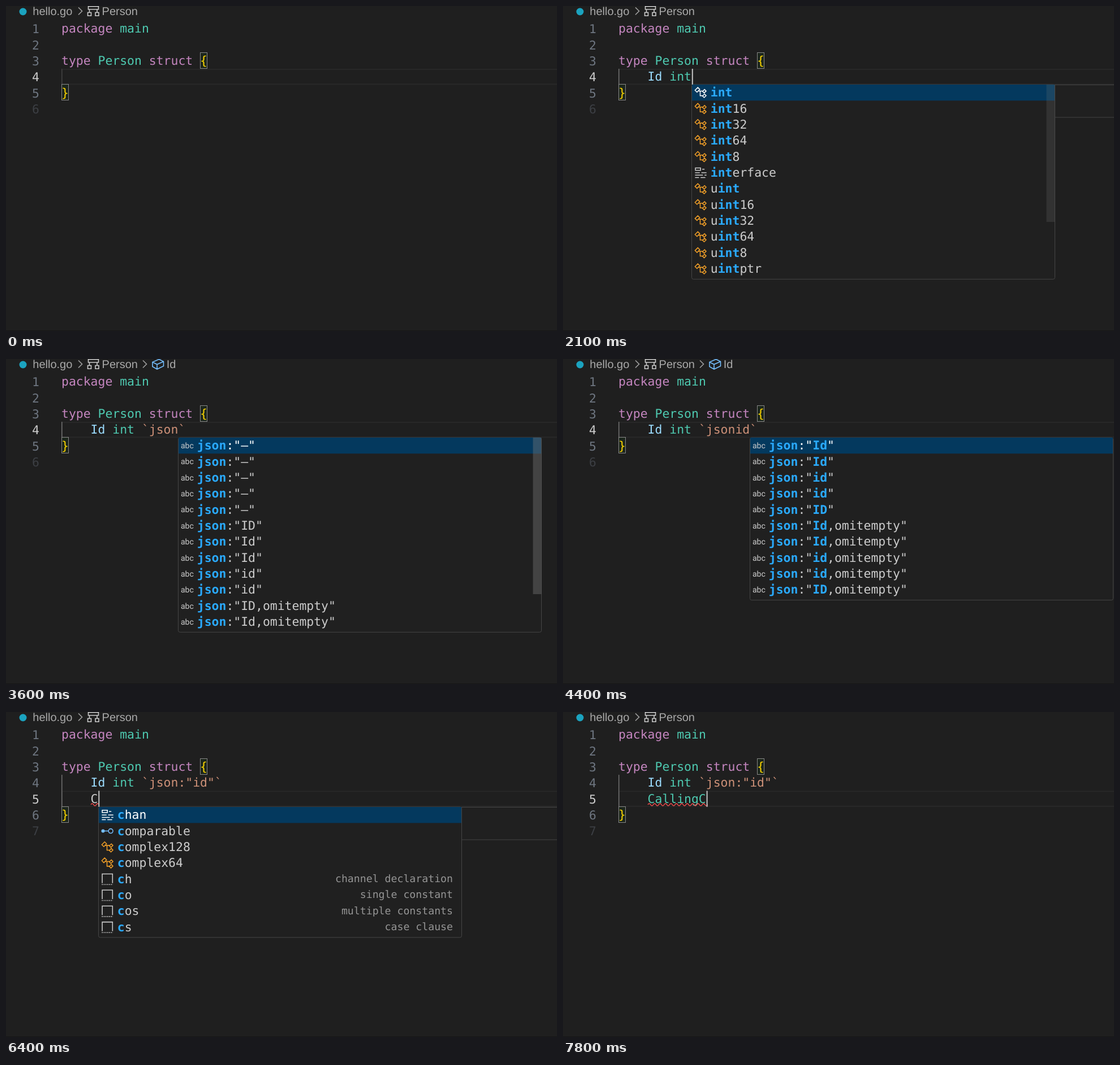
These frames come from a looping animation (974 px wide and 575 px high, 8000 ms). An HTML page:

```html
<!DOCTYPE html>
<html lang="en">
<head>
<meta charset="utf-8">
<title>Typing a struct</title>
<style>
  html, body { margin: 0; width: 100%; height: 100%; overflow: hidden; background: #1f1f1f; }
  svg { display: block; width: 974px; height: 575px; }
  text { font: 21.43px "DejaVu Sans Mono", monospace; white-space: pre; text-rendering: geometricPrecision; }
  .ui { font: 20px "Liberation Sans", Arial, sans-serif; }
  .abc { font: 14px Roboto, sans-serif; }
  .note { font-size: 18.2px; text-anchor: end; }
  .hit { font-weight: bold; fill: #2aaaff; }
</style>
</head>
<body>
<svg id="stage" viewBox="0 0 974 575"></svg>
<script>
const LOOP = 8000, CW = 12.9, LH = 28.36, LEFT = 98, POP_W = 642;
const PINK = '#c586c0', TEAL = '#4ec9b0', GREY = '#cccccc', BLUE = '#9cdcfe',
      STR = '#ce9178', GOLD = '#ffd700', ORANGE = '#ee9d28', SKY = '#75beff', EDGE = '#454545';

// Suggestions: icon letter, label, optional note
const sizes = ['', '16', '32', '64', '8'];
const INTS = [...sizes.map(s => ['t', 'int' + s]), ['k', 'interface'],
              ...sizes.map(s => ['t', 'uint' + s]), ['t', 'uintptr']];
const tags = names => names.map(n => ['a', `json:"${n}"`]);
const KEYS = ['Id', 'Id', 'id', 'id', 'ID'];
const TAGS = tags(['–', '–', '–', '–', '–', 'ID', 'Id', 'Id', 'id', 'id', 'ID,omitempty', 'Id,omitempty']);
const ID_TAGS = tags([...KEYS, ...KEYS.map(k => k + ',omitempty')]);
const CS = [['k', 'chan'], ['i', 'comparable'], ['t', 'complex128'], ['t', 'complex64'],
            ['s', 'ch', 'channel declaration'], ['s', 'co', 'single constant'],
            ['s', 'cos', 'multiple constants'], ['s', 'cs', 'case clause']];

const pop = (list, word, more = {}) => ({ list, word, sel: 0, ...more });
const ints = word => pop(INTS, word, { docs: 1, bar: 243, fade: .2 });
const json = word => pop(TAGS, word, { bar: 277, fade: .4 });
const picked = sel => pop(ID_TAGS, 'jsonid', { sel });

// Each step changes only the listed parts of the state
const STEPS = [
  [0, { rows: [''], tint: GREY, wave: 0, caret: 0, shut: 0, crumb: 0, pop: null, guide: '#404040' }],
  [300, { caret: 1 }],
  [800, { type: 'I', guide: '#707070' }],
  [900, { wave: 1, pop: ints('i') }],
  [1000, { type: 'Id', pop: null }],
  [1100, { wave: 2 }],
  [1300, { type: 'Id ' }],
  [1400, { tint: TEAL }],
  [1800, { type: 'Id i' }],
  [1900, { tint: BLUE, wave: 0, pop: ints('i') }],
  [2000, { type: 'Id in', pop: ints('in') }],
  [2100, { type: 'Id int', pop: ints('int') }],
  [2200, { type: 'Id int ', pop: null }],
  [2400, { type: 'Id int ``', shut: 1 }],
  [2800, { type: 'Id int `j`' }],
  [2900, { type: 'Id int `js`', pop: json('js') }],
  [3000, { type: 'Id int `jso`', pop: json('jso') }],
  [3100, { type: 'Id int `json`', pop: json('json') }],
  [3500, { crumb: 1 }],
  [3600, { caret: 0 }],
  [3800, { type: 'Id int `jsoni`', caret: 1, pop: pop(ID_TAGS, 'jsoni') }],
  [3900, { type: 'Id int `jsonid`', pop: picked(0) }],
  [4400, { caret: 0 }],
  [4500, { pop: picked(1) }],
  [4600, { pop: picked(2) }],
  [4900, { type: 'Id int `json:"id"`', caret: 1, pop: null }],
  [5400, { rows: ['Id int `json:"id"`', ''], shut: 0, tint: GREY }],
  [5900, { crumb: 0, caret: 0 }],
  [6300, { type: 'C', caret: 1 }],
  [6400, { wave: 1, pop: pop(CS, 'c', { docs: 1 }) }],
  [6500, { type: 'Ca', pop: pop(CS.slice(0, 2), 'ca') }],
  [6600, { type: 'Cal', tint: TEAL, wave: 3, pop: pop(CS.slice(1, 2), 'cal') }],
  [6700, { type: 'Call', wave: 4, pop: null }],
  [6800, { pop: pop([['m', 'syscall']], 'call') }],
  [7000, { type: 'Calli', wave: 5, pop: null }],
  [7100, { type: 'Callin', wave: 6 }],
  [7300, { type: 'Calling', wave: 7 }],
  [7800, { type: 'CallingC', wave: 8 }]
];

let last = {};
const states = STEPS.map(([at, change]) => {
  const { type, ...rest } = change;
  last = { ...last, ...rest, at };
  if (type) last.rows = [...last.rows.slice(0, -1), type];
  return last;
});

const colX = col => LEFT + col * CW;
const lineY = n => 26 + (n - 1) * LH;
const rect = (x, y, w, h, fill, more = '') =>
  `<rect x="${x}" y="${y}" width="${w}" height="${h}" fill="${fill}" ${more}/>`;
const path = (d, stroke, width = 1.5, more = '') =>
  `<path d="${d}" fill="none" stroke="${stroke}" stroke-width="${width}" ${more}/>`;
const text = (x, y, s, fill, cls = '') =>
  `<text x="${x}" y="${y}" fill="${fill}" class="${cls}">${s}</text>`;
const code = (n, col, s, fill) => text(colX(col), lineY(n) + 21.3, s, fill);

function icon(kind, x, y, lit) {
  const draw = (d, c, more) =>
    `<g transform="translate(${x} ${y}) scale(1.4)">${path(d, c, 1.1, more)}</g>`;
  switch (kind) {
    case 't': return draw('M1 5L4.5 1.5L7 4L3.5 7.5ZM5.5 6H11M7.5 6V12H11' +
      'M10.5 6.5L13 4L15 6L12.5 8.5ZM10.5 12.3L13 9.8L15 11.8L12.5 14.3Z', lit ? '#fff' : ORANGE);
    case 'k': return draw('M1.5 2H8V5H1.5ZM10 3.5H13M1 8H7M9 8H15.5M1 11H11M13 11H15.5M1 14H6M8 14H14',
      lit ? '#fff' : GREY);
    case 'i': return draw('M4 8H9.5M15 8A2.8 2.8 0 1 1 9.4 8A2.8 2.8 0 1 1 15 8', SKY) +
      `<circle cx="${x + 3.5}" cy="${y + 11.2}" r="3" fill="${SKY}"/>`;
    case 's': return draw('M1.5 13V1.5H14.5V13', GREY) +
      draw('M1 14.8H15', GREY, 'stroke-dasharray="1.2 1.1"');
    case 'm': return text(x - 1, y + 18, '{}', '#fff');
    default: return text(x, y + 16, 'abc', GREY, 'abc');
  }
}

// Bold the typed letters, taken in order from the label
function label(s, word) {
  let i = 0;
  return [...s].map(ch => {
    const hit = i < word.length && ch.toLowerCase() === word[i];
    if (hit) i++;
    return hit ? `<tspan class="hit">${ch}</tspan>` : ch;
  }).join('');
}

function popup(p, col, y) {
  const x = Math.min(Math.round(colX(col)), 331) + .5;
  const h = p.list.length * LH + 4, right = x + POP_W;
  let out = '';
  if (p.docs) out += rect(right, y + .5, 200, 57.5, '#202020', `stroke="${EDGE}"`);
  out += rect(x, y, POP_W, h, '#202020', `stroke="${EDGE}" rx="3"`);
  out += rect(x + .5, y + p.sel * LH, POP_W - 1, LH, '#04395e');
  p.list.forEach(([kind, name, note], i) => {
    const top = y + i * LH;
    out += icon(kind, x + 4.5, top + 3, i === p.sel);
    out += text(x + 33.3, top + 21.2, label(name, p.word), i === p.sel ? '#fff' : GREY);
    if (note) out += text(right - 15.5, top + 19.6, note, '#959595', 'note');
  });
  if (p.bar) out += rect(right - 15, y, 15, p.bar, '#797979', `opacity="${p.fade}"`);
  return out;
}

function crumbs(more) {
  const chevron = x => path(`M${x} 2.5l6.5 6.5l-6.5 6.5`, '#a0a0a0', 1.6);
  let out = '<circle cx="30" cy="10" r="6.5" fill="#1ba3bf"/>' +
    text(47.3, 16, 'hello.go', '#a9a9a9', 'ui') + chevron(128) +
    path('M145.5 .8H163.5V6H145.5ZM144.5 11.5H150.5V17.3H144.5ZM158 11.5H164V17.3H158Z' +
      'M147.5 6V11.5M161 6V11.5', GREY, 1.6) +
    text(169.6, 16, 'Person', '#a9a9a9', 'ui');
  if (more) out += chevron(242) +
    path('M259 5.5L270.5 .5L278.5 4.5V12.5L267 18L259 13.5ZM259 5.5L267 9.5L278.5 4.5M267 9.5V18', SKY, 1.6) +
    text(283.8, 16, 'Id', '#a9a9a9', 'ui');
  return out;
}

function brace(n, col, ch) {
  const x = Math.round(colX(col)) + .5;
  return rect(x, Math.round(lineY(n)) - .5 + (n > 3 ? .0 : .0), 12, 28, 'rgba(0,100,0,.1)', 'stroke="#888"') +
    code(n, col, ch, GOLD);
}

function field(n, s, tint) {
  const [, name, type, tag] = s.match(/^(\w*)( ?\w*)(.*)$/);
  return code(n, 4, name, tint) + code(n, 4 + name.length, type, TEAL) +
    code(n, 4 + name.length + type.length, tag, STR);
}

function squiggle(n, chars) {
  const halves = Math.round(chars * CW / 4.8);
  return path(`M150 ${lineY(n) + 24.5}q2.4 -4 4.8 0` + 't4.8 0'.repeat(halves - 1), '#f14c4c', 1.4);
}

function render(s) {
  const row = 3 + s.rows.length, total = row + 2, top = lineY(row);
  const typed = s.rows[s.rows.length - 1], col = 4 + typed.length - s.shut;
  let out = rect(0, 0, 974, 575, '#1f1f1f') + rect(0, 574, 974, 1, '#151515');
  out += rect(LEFT + 1, top + 1, 900, LH - 2, 'none', 'stroke="#282828" stroke-width="2"');
  out += crumbs(s.crumb);
  for (let n = 1; n <= total; n++) {
    const fill = n === row ? GREY : n === total ? '#3c3f44' : '#6e7681';
    out += text(46, lineY(n) + 22.3, n, fill);
  }
  out += code(1, 0, 'package', PINK) + code(1, 8, 'main', TEAL);
  out += code(3, 0, 'type', PINK) + code(3, 5, 'Person', TEAL) + code(3, 12, 'struct', PINK);
  out += rect(LEFT, lineY(4), 1.5, s.rows.length * LH, s.guide);
  out += brace(3, 19, '{') + brace(row + 1, 0, '}');
  s.rows.forEach((r, i) => { out += field(4 + i, r, 4 + i === row ? s.tint : BLUE); });
  if (s.wave) out += squiggle(row, s.wave);
  if (s.caret) out += rect(colX(col) + .8, top, 2, LH, '#c4c4c4');
  if (s.pop) out += popup(s.pop, col, Math.round(top + LH));
  return out;
}

const stage = document.getElementById('stage');
const start = performance.now();
let shown = null;
function tick() {
  const t = (performance.now() - start) % LOOP;
  const now = states.filter(s => s.at <= t).pop();
  if (now !== shown) stage.innerHTML = render(shown = now);
  requestAnimationFrame(tick);
}
tick();
</script>
</body>
</html>
```
